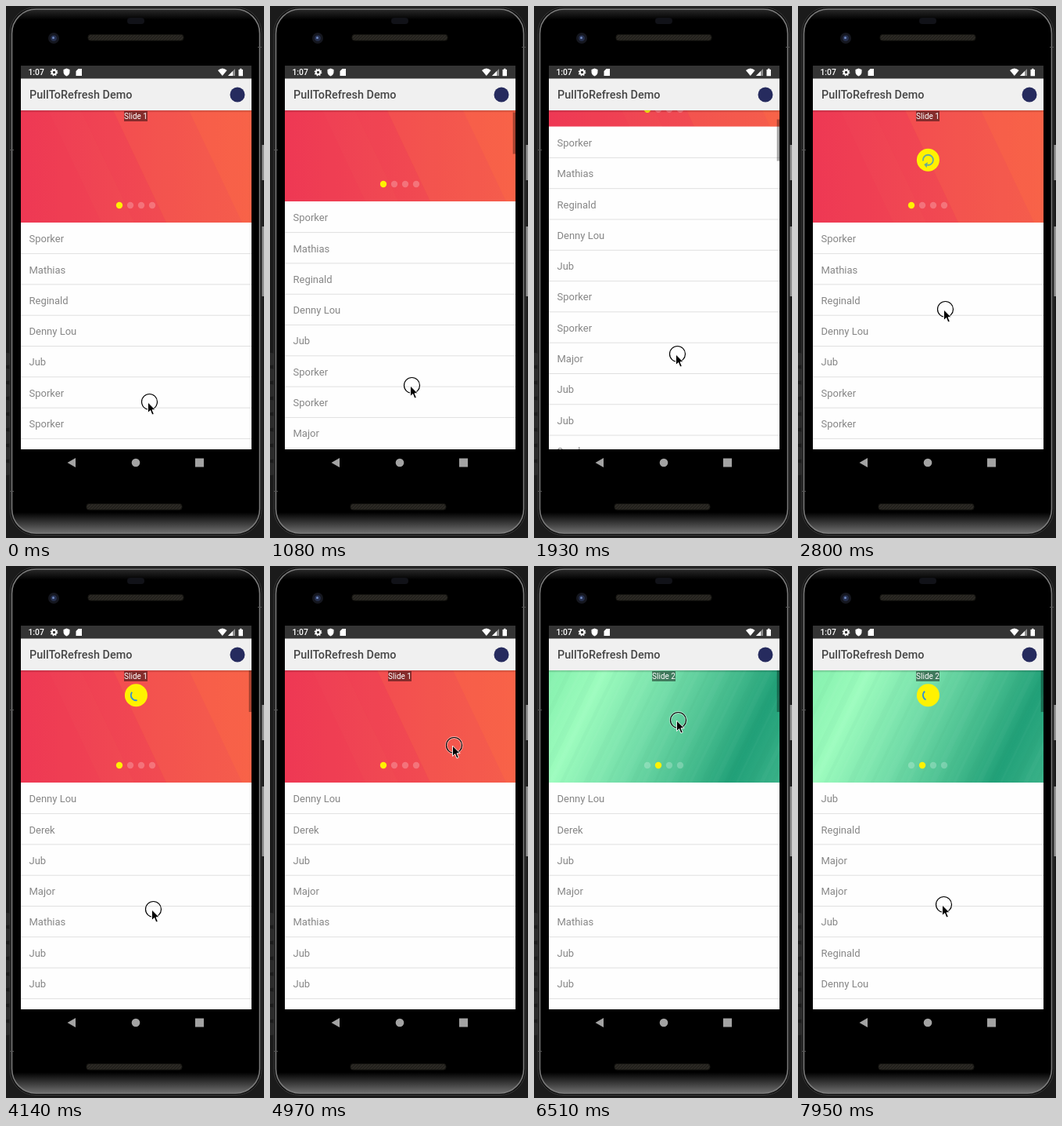
An HTML page that plays this animation: 330 px wide and 678 px high, repeating every 8 s.

```html
<!DOCTYPE html>
<html lang="en">
<head>
<meta charset="utf-8">
<title>PullToRefresh Demo</title>
<style>
html, body { margin: 0; width: 100%; height: 100%; overflow: hidden; background: #1b1b1b; }
svg { display: block; width: 330px; height: 678px; font-family: Roboto, sans-serif; }
.row { font-size: 13px; fill: #868686; }
.label { font-size: 10px; fill: #fff; text-anchor: middle; }
</style>
</head>
<body>
<svg viewBox="0 0 330 678">
  <defs>
    <clipPath id="view"><path d="M19 133H314V565H19z"/></clipPath>
    <clipPath id="card"><path d="M0 0H295V143H0z"/></clipPath>
    <linearGradient id="red"><stop stop-color="#ee3a55"/><stop offset="1" stop-color="#f35a4f"/></linearGradient>
    <linearGradient id="green" gradientUnits="userSpaceOnUse" x1="0" y1="0" x2="290" y2="142">
      <stop stop-color="#84f0ad"/><stop offset=".2" stop-color="#9dfcbe"/><stop offset=".45" stop-color="#72dca8"/>
      <stop offset=".68" stop-color="#45bb8d"/><stop offset=".84" stop-color="#21a078"/><stop offset="1" stop-color="#39b188"/>
    </linearGradient>
    <linearGradient id="body" x2="0" y2="1">
      <stop stop-color="#2a2a2a"/><stop offset=".02" stop-color="#000"/><stop offset=".96" stop-color="#000"/><stop offset="1" stop-color="#707070"/>
    </linearGradient>
    <linearGradient id="shade" x2="0" y2="1"><stop stop-opacity=".2"/><stop offset="1" stop-opacity="0"/></linearGradient>
    <pattern id="mesh" width="4" height="4" patternUnits="userSpaceOnUse"><path d="M0 0H4V4H0z" fill="#2b2924"/><path d="M0 4L4 0" stroke="#1c1a17"/></pattern>
    <pattern id="spots" width="12" height="20" patternUnits="userSpaceOnUse"><circle cx="1" cy="10" r="8" fill="#2a2a2a"/></pattern>
  </defs>

  <!-- phone -->
  <path d="M0 0H330V678H0z" fill="#1b1b1b"/>
  <path d="M0 440H6V602H0z" fill="url(#spots)"/>
  <path d="M326 177h4v45h-4zM326 281h4v89h-4z" fill="#929292"/>
  <rect x="5" y="1.500" width="322" height="673" rx="33" fill="#0c0c0c" stroke="#383838"/>
  <rect x="7.500" y="4" width="317" height="668" rx="31" fill="url(#body)" stroke="#7a7a7a" stroke-width="1.600"/>
  <path d="M5 183.500h5M5 618.500h5M322 52.500h5" stroke="#555"/>
  <rect x="155" y="15" width="22" height="8" rx="4" fill="#111218"/>
  <rect x="105" y="36.500" width="122" height="7.500" rx="3" fill="url(#mesh)" stroke="#171612"/>
  <rect x="103" y="634.500" width="122" height="7.500" rx="3" fill="url(#mesh)" stroke="#171612"/>
  <circle cx="61" cy="41" r="7" fill="#15171f"/>
  <circle cx="61" cy="41" r="3.800" fill="#26304f"/><circle cx="60.500" cy="40.500" r="1.500" fill="#6f88bd"/>
  <g fill="#a3a3a3"><path d="M78.500 582L89 576V588z"/><circle cx="166" cy="582" r="5.300"/><path d="M242 576.500h11v11h-11z"/></g>

  <path d="M19 76H314V565H19z" fill="#fefefe"/>
  <g clip-path="url(#view)">
    <g id="list">
      <g clip-path="url(#card)" transform="translate(19 133)"><g id="slides"></g></g>
      <g id="dots"></g>
      <g id="rows"></g>
    </g>
    <rect id="bar" x="310.700" width="3.300" fill="#000" fill-opacity=".34"/>
    <g id="spinner">
      <circle r="14.500" fill="#fff200"/>
      <g id="icon"><path id="arc" fill="none" stroke="#2f8fd8" stroke-width="1.800"/><path id="tip" d="M-3.600 0H3.600L0 4z" fill="#2f8fd8"/></g>
    </g>
  </g>

  <!-- app bar and status bar -->
  <path d="M19 76H314V93H19z" fill="#343434"/>
  <path d="M19 92.500H314V133H19z" fill="#f0f0f0"/>
  <path d="M19 133H314V136H19z" fill="url(#shade)"/>
  <text x="30" y="118.300" font-size="14.400" font-weight="500" fill="#454545">PullToRefresh Demo</text>
  <circle cx="296" cy="113" r="9.500" fill="#262b5e"/>
  <text x="28.500" y="88" font-size="10.300" font-weight="500" fill="#fff">1:07</text>
  <g fill="#fff">
    <circle cx="61.500" cy="84.500" r="2.700" fill="none" stroke="#fff" stroke-width="2"/>
    <circle cx="61.500" cy="84.500" r="4.100" fill="none" stroke="#fff" stroke-width="1.500" stroke-dasharray="1.600 1.620"/>
    <path d="M77.500 79.500l4 1.600v3q0 3.600-4 5.400q-4-1.800-4-5.400v-3z"/>
    <path d="M92.500 80h4.500v9h-7.500v-6z"/>
    <path d="M271 82q5.800-5 11.600 0l-5.800 7z"/>
    <path d="M293 80v9h-9z" opacity=".45"/><path d="M290 83v6h-6z"/>
    <path d="M297.500 81h1.500v-1.200h2.500v1.200h1.500v8.200h-5.500z"/>
  </g>

  <g id="cursor">
    <circle r="10" fill="none" stroke="#fff" stroke-opacity=".55" stroke-width="2.800"/>
    <circle r="10" fill="none" stroke="#000" stroke-width="1.200"/>
    <path d="M-2 .5V14L1.200 11L3.400 16.500L5.800 15.500L3.500 10.200H7.600z" fill="#000" stroke="#fff" stroke-width=".9"/>
  </g>
</svg>
<script>
const $ = id => document.getElementById(id);
const place = (id, x, y, more = '') => $(id).setAttribute('transform', `translate(${x} ${y}) ${more}`);
const ROW = 39.3, LOOP = 8000;

const names = { T: 'Sporker', W: 'Mathias', F: 'Reginald', B: 'Denny Lou', M: 'Jub', C: 'Major', J: 'Hamford', L: 'Derek' };
const lists = ['TWFBMTTCMMTJLM', 'BLMCWMMFBTCLMW', 'MFCCMFBLWMTCJB'];

// Parallel stripes whose lower end is shifted by lean
const stripes = (items, lean) => items.map(([x, w, color, alpha]) =>
  `<path d="M${x} 0h${w}l${lean} 143h${-w}z" fill="${color}" opacity="${alpha}"/>`).join('');
const slide = (n, fill, items, lean) => `<g transform="translate(${295 * (n - 1)})"><g clip-path="url(#card)">
  <path d="M0 0H295V143H0z" fill="url(#${fill})"/>${stripes(items, lean)}
  <path d="M132 1h30v13h-30z" fill="#000" opacity=".45"/><text class="label" x="147" y="11">Slide ${n}</text></g></g>`;
const bands = [[-70, 105, '#e8264f', 0.1], [77, 41, '#e8264f', 0.08], [118, 250, '#ff7040', 0.16], [215, 160, '#ff7040', 0.26]];
const fine = Array.from({ length: 26 }, (_, i) => [i * 15 - 6, 3 + i * 5 % 7, i % 2 ? '#fff' : '#064', 0.025]);

$('slides').innerHTML = slide(1, 'red', bands, 68) + slide(2, 'green', fine, -70);
$('dots').innerHTML = [0, 1, 2, 3].map(i => `<circle cx="${145 + 14 * i}" cy="254" r="4.200"/>`).join('');
$('rows').innerHTML = [...lists[0]].map((_, i) => {
  const y = 276 + ROW * i;
  return `<text class="row" x="29.500" y="${y + 25.2}"></text><path d="M19 ${y + ROW + .3}H314" stroke="#e0e0e0"/>`;
}).join('');
const dots = [...$('dots').children], rows = [...document.querySelectorAll('.row')];

const smooth = u => u * u * (3 - 2 * u);
const out = u => 1 - (1 - u) ** 3;

// Keys are [time, values, easing into this key]
function track(t, keys) {
  const i = keys.findIndex(k => k[0] > t);
  if (i < 0) return keys[keys.length - 1][1];
  if (!i) return keys[0][1];
  const [t0, a] = keys[i - 1], [t1, b, ease = smooth] = keys[i];
  const u = ease((t - t0) / (t1 - t0));
  return a.map((v, n) => v + (b[n] - v) * u);
}

const pointer = [
  [50, [183, 504]], [500, [181, 522]], [860, [181, 522]], [1500, [182, 381]], [1740, [182, 381]],
  [2120, [184, 505]], [2480, [188, 236]], [3350, [188, 437], out], [4250, [188, 437]],
  [5050, [236, 222]], [5400, [190, 218]], [5750, [174, 215]], [5920, [86, 222]], [6080, [86, 222]],
  [6480, [184, 196]], [6620, [184, 196]], [7430, [186, 431]]
];
const scrolling = [[900, [0]], [1650, [184]], [1760, [184]], [2200, [0]]];
const swipe = [[5725, [0]], [5920, [86]], [6040, [295]]];
const barFade = [
  [900, [0]], [960, [1]], [2450, [1]], [2680, [0]], [3810, [0]], [3830, [1]], [4120, [1]], [4350, [0]],
  [5960, [0]], [6000, [1]], [6950, [1]], [7150, [0]], [7650, [0]], [7670, [1]]
];
const pulls = [
  { start: 2480, from: 236, release: 3610, spin: 3820, end: 4440, angle: 8 },
  { start: 6620, from: 196, release: 7460, spin: 7670, end: 9000, angle: 55 }
];

const point = (deg, r = 6.5) => [r * Math.cos(deg * Math.PI / 180), r * Math.sin(deg * Math.PI / 180)];

function drawArc(start, sweep) {
  const [x0, y0] = point(start), [x1, y1] = point(start + sweep);
  $('arc').setAttribute('d', `M${x0} ${y0}A6.5 6.5 0 ${sweep > 180 ? 1 : 0} 1 ${x1} ${y1}`);
  place('tip', x1, y1, `rotate(${start + sweep})`);
}

function drawSpinner(t, y) {
  const p = pulls.find(p => t >= p.start && t < p.end + 150);
  $('spinner').style.display = p ? '' : 'none';
  if (!p) return;
  const pulled = Math.min(222, 119.5 + 0.51 * (y - p.from));
  const back = out(Math.min(1, Math.max(0, (t - p.release) / (p.spin - p.release))));
  const scale = 1 - Math.max(0, t - p.end) / 150;
  place('spinner', 166.4, pulled + (164.7 - pulled) * back, `scale(${scale})`);
  const spinning = t >= p.spin, amount = Math.min(1, (pulled - 119) / 60);
  $('tip').style.display = spinning ? 'none' : '';
  $('icon').setAttribute('opacity', spinning ? 1 : 0.3 + 0.45 * amount);
  if (spinning) {
    const u = (t - p.spin) / 1332;
    const grow = smooth(Math.min(1, u * 2)), shrink = smooth(Math.max(0, u * 2 - 1));
    drawArc(p.angle + 292 * u + 284 * shrink, 4 + 284 * (grow - shrink));
  } else {
    drawArc(170 + (pulled - 196) * 3, 10 + 280 * amount);
  }
}

function draw(t) {
  const [x, y] = track(t, pointer), [scroll] = track(t, scrolling);
  place('cursor', Math.round(x) + .5, Math.round(y) + .5);
  place('list', 0, -scroll);
  place('slides', -Math.round(track(t, swipe)[0]), 0);

  const list = lists[t < 3820 ? 0 : t < 7660 ? 1 : 2];
  rows.forEach((row, i) => { row.textContent = names[list[i]]; });
  const page = t < 6080 ? 0 : 1;
  dots.forEach((dot, i) => {
    dot.setAttribute('fill', i === page ? '#fff200' : '#fff');
    dot.setAttribute('opacity', i === page ? 1 : 0.24);
  });

  $('bar').setAttribute('y', 133 + scroll * 17 / 181);
  $('bar').setAttribute('height', scroll < 143 ? 53 : 99);
  $('bar').setAttribute('opacity', track(t, barFade)[0]);
  drawSpinner(t, y);
}

function frame() {
  draw(performance.now() % LOOP);
  requestAnimationFrame(frame);
}
frame();
</script>
</body>
</html>
```
